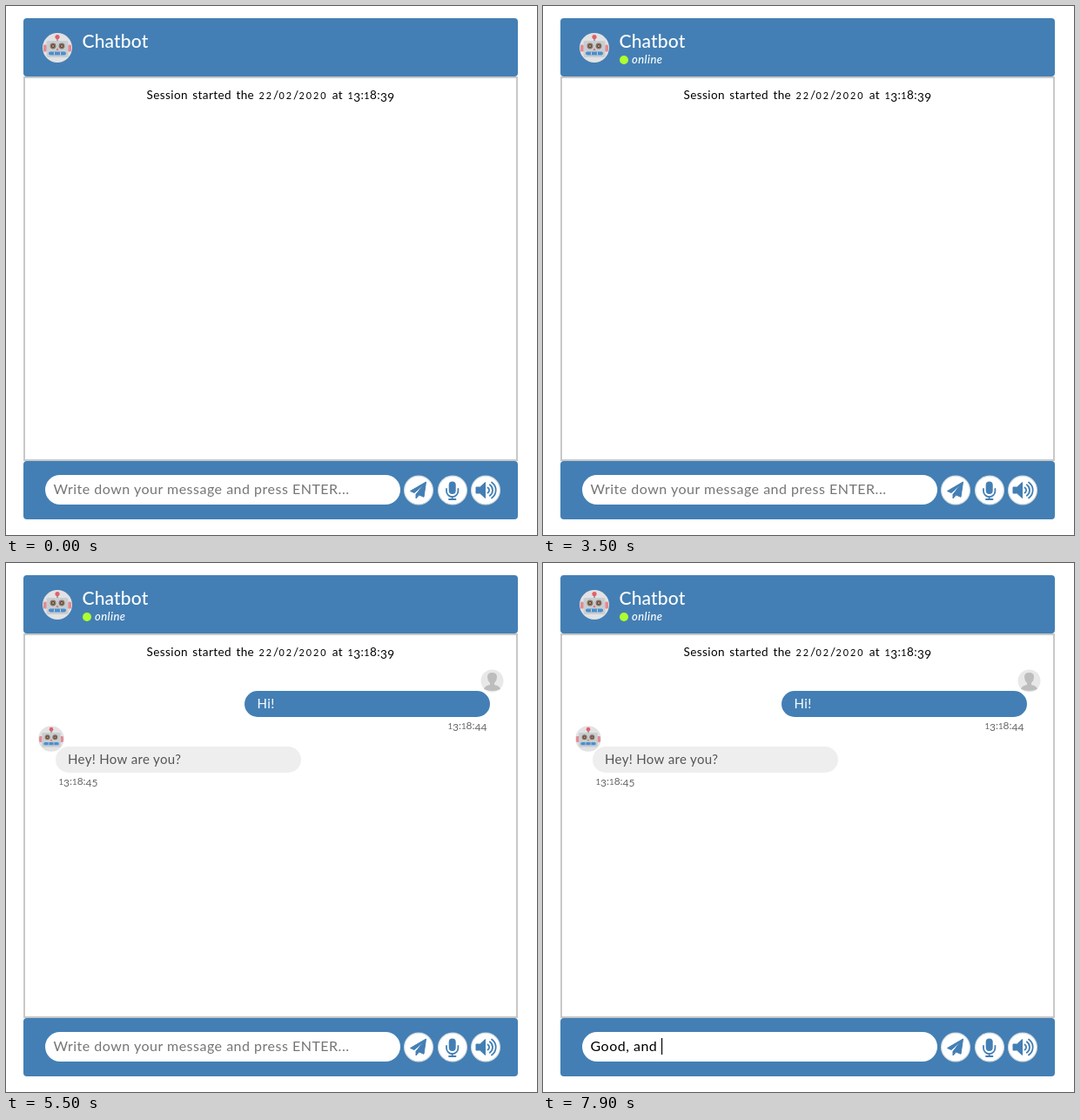
Write an HTML page that moves like this. It is 610 px wide and 608 px high and loops after 8 s.

```html
<!DOCTYPE html>
<html lang="en">
<head>
<meta charset="utf-8">
<title>Chatbot</title>
<style>
  html, body { margin: 0; width: 100%; height: 100%; overflow: hidden; background: #fff; }
  svg { display: block; width: 610px; height: 608px; }
  text { font-family: Raleway, Lato, "Open Sans", sans-serif; white-space: pre; }
  .bar { fill: #437fb4; }
  .title { font-size: 21px; font-weight: 500; letter-spacing: .15px; fill: #fff; }
  .status { font-size: 13px; font-weight: 500; font-style: italic; letter-spacing: .45px; fill: #fff; }
  .session { font-size: 13.5px; letter-spacing: .4px; word-spacing: 1.6px; text-anchor: middle; }
  .field { font-size: 16px; letter-spacing: .5px; }
  .hint { fill: #757575; }
  .msg { font-size: 15px; letter-spacing: .35px; }
  .time { font-size: 12px; fill: #666; }
  /* old-style figures */
  .short { font-size: .8em; }
  .wide { letter-spacing: .18em; }
  .drop { baseline-shift: -.2em; }
  .time .wide { letter-spacing: 0; }
</style>
</head>
<body>
<svg viewBox="0 0 610 608">
  <defs>
    <g id="robot">
      <circle r="17" fill="#e2e2e4"/>
      <rect x="-1" y="-12" width="2" height="5" fill="#9aa0a4"/>
      <circle cy="-12.5" r="2.6" fill="#e2606a"/>
      <rect x="-16" y="-3.5" width="4" height="8" rx="1.5" fill="#e58a92"/>
      <rect x="12" y="-3.5" width="4" height="8" rx="1.5" fill="#e58a92"/>
      <rect x="-12.5" y="-8" width="25" height="19" rx="2" fill="#c9cdd0"/>
      <g stroke="#84746a" stroke-width="1.5" fill="#51443d">
        <circle cx="-5" cy="-2" r="2.7"/>
        <circle cx="5" cy="-2" r="2.7"/>
      </g>
      <g fill="#e8a15c">
        <circle cx="-5" cy="-2" r="1"/>
        <circle cx="5" cy="-2" r="1"/>
      </g>
      <path d="M0 0l1.6 3h-3.2z" fill="#d9767c"/>
      <rect x="-10" y="4.6" width="20" height="3.8" rx="1.8" fill="#4a8fce"/>
      <path d="M-3.5 4.6v3.8M3.5 4.6v3.8" stroke="#c9cdd0"/>
    </g>
    <circle id="key" r="16.4" fill="#fff" stroke="#d5dce2" stroke-width="1.2"/>
  </defs>

  <rect class="bar" x="20" y="14" width="568" height="67" rx="4"/>
  <rect x="21" y="82" width="566" height="440" fill="#fff" stroke="#c8c8c8" stroke-width="2"/>
  <rect class="bar" x="20" y="523" width="568" height="67" rx="4"/>

  <use href="#robot" x="59" y="48"/>
  <text class="title" x="87.5" y="48">Chatbot</text>
  <g id="online">
    <circle cx="93" cy="62" r="5" fill="#adff2f"/>
    <text class="status" x="102" y="66">online</text>
  </g>
  <text class="session figures" x="304" y="107">Session started the 22/02/2020 at 13:18:39</text>

  <g id="sent">
    <circle cx="558.5" cy="135.5" r="13" fill="#e8e8e8"/>
    <path d="M549 145q1-4 7-5v-2q-3-3-3-7 0-5 5.500-5t5.500 5q0 4-3 7v2q6 1 7 5-9 4-19 0z" fill="#bdbdbd"/>
    <rect class="bar" x="274" y="147" width="282" height="30" rx="15"/>
    <text class="msg" x="288.500" y="167" fill="#fff">Hi!</text>
    <text class="time figures" x="552.500" y="191" text-anchor="end">13:18:44</text>
  </g>

  <g id="reply">
    <use href="#robot" transform="translate(52 202) scale(.87)"/>
    <rect x="57" y="211" width="282" height="30" rx="15" fill="#eee"/>
    <text class="msg" x="71" y="231" fill="#555">Hey! How are you?</text>
    <text class="time figures" x="60.500" y="255">13:18:45</text>
  </g>

  <rect x="45" y="539" width="408" height="34" rx="17" fill="#fff"/>
  <text class="field hint" id="hint" x="54.500" y="561">Write down your message and press ENTER...</text>
  <text class="field" id="draft" x="54.500" y="561"></text>
  <rect id="caret" y="546" width="1.200" height="19"/>

  <use href="#key" x="474" y="556.500"/>
  <path class="bar" d="M482.500 547L464.500 557.500 469 559.500 479.500 550.500 471 561.300V566L474.500 562 480 564.300z"
    stroke="#437fb4" stroke-linejoin="round"/>
  <use href="#key" x="513" y="556.500"/>
  <rect class="bar" x="508.700" y="546.500" width="8" height="14.500" rx="4"/>
  <path d="M506 555v2.500a6.700 6.700 0 0 0 13.400 0V555M512.700 564v3M509 567h7.500"
    fill="none" stroke="#437fb4" stroke-width="1.800" stroke-linecap="round"/>
  <use href="#key" x="551" y="556.500"/>
  <path class="bar" d="M540 553h4.500l6-5.500v18l-6-5.500H540z" stroke="#437fb4" stroke-linejoin="round"/>
  <path d="M553.500 553.500a3.600 3.600 0 0 1 0 6M555.800 550.300a7.600 7.600 0 0 1 0 12.400M558 547.500a11 11 0 0 1 0 18"
    fill="none" stroke="#437fb4" stroke-width="1.800" stroke-linecap="round"/>

  <g id="pointer">
    <path id="arrow" d="M0 0v14l3.200-3 2.200 5 2.300-1-2.200-4.800H10z" stroke="#fff"/>
    <g id="beam" fill="none" stroke-linecap="round">
      <path id="stem" d="M-3-7q3 0 3 2.500V4.500Q0 7-3 7M3-7q-3 0-3 2.500V4.500Q0 7 3 7M-2 2.500h4" stroke="#fff" stroke-width="2.800"/>
      <use href="#stem" style="stroke:#111"/>
      <path d="M-3-7q3 0 3 2.500V4.500Q0 7-3 7M3-7q-3 0-3 2.500V4.500Q0 7 3 7M-2 2.500h4" stroke="#111" stroke-width="1.300"/>
    </g>
  </g>
</svg>
<script>
  const LOOP = 8000, TICK = 100, FOCUS = 1900, SEND = 4600, REPLY = 5400, HIDE = 3500;
  const $ = id => document.getElementById(id);
  const show = (id, on) => $(id).setAttribute('visibility', on ? 'visible' : 'hidden');

  // [time, field content]
  const edits = [
    [FOCUS, ''], [3600, 'H'], [3800, 'Hi'], [4100, 'Hi!'], [SEND, ''],
    [6400, 'G'], [6600, 'Go'], [6800, 'Goo'], [7000, 'Good'], [7200, 'Good,'],
    [7500, 'Good, '], [7600, 'Good, a'], [7700, 'Good, an'], [7800, 'Good, and'], [7900, 'Good, and ']
  ];

  // [time, x, y]
  const path = [[1400, 4, 596], [1500, 27, 580], [1600, 50, 568], [1700, 61, 563], [1900, 57, 562], [2200, 52, 561]];

  function pointerAt(t) {
    const i = path.findIndex(p => p[0] > t);
    if (i < 0) return path[path.length - 1].slice(1);
    if (i === 0) return path[0].slice(1);
    const [t0, x0, y0] = path[i - 1], [t1, x1, y1] = path[i];
    const k = (t - t0) / (t1 - t0);
    return [x0 + (x1 - x0) * k, y0 + (y1 - y0) * k];
  }

  function styleFigures(el) {
    const wrap = d => {
      if ('012'.includes(d)) return `<tspan class="short${d === '1' ? '' : ' wide'}">${d}</tspan>`;
      return '68'.includes(d) ? d : `<tspan class="drop">${d}</tspan>`;
    };
    el.innerHTML = el.textContent.replace(/\d/g, wrap);
  }

  function draw(t) {
    $('online').setAttribute('opacity', t < 300 ? 0 : t < 400 ? .5 : 1);
    show('sent', t >= SEND);
    show('reply', t >= REPLY);

    const [since, text] = edits.filter(e => e[0] <= t).pop() || [0, ''];
    const draft = $('draft');
    if (draft.textContent !== text) draft.textContent = text;
    show('hint', !text);
    show('caret', t >= FOCUS && (t - since) % 1000 < 500);
    $('caret').setAttribute('x', 54.6 + (text ? draft.getComputedTextLength() : 0));

    const [x, y] = pointerAt(t);
    const moving = t >= path[0][0] && t < HIDE;
    const inField = x > 45 && y < 573;
    $('pointer').setAttribute('transform', `translate(${x} ${y})`);
    show('arrow', moving && !inField);
    $('beam').setAttribute('display', moving && inField ? 'inline' : 'none');
  }

  document.querySelectorAll('.figures').forEach(styleFigures);
  const start = performance.now();
  function frame() {
    const t = (performance.now() - start) % LOOP;
    draw(Math.floor(t / TICK) * TICK);
    requestAnimationFrame(frame);
  }
  frame();
</script>
</body>
</html>
```
